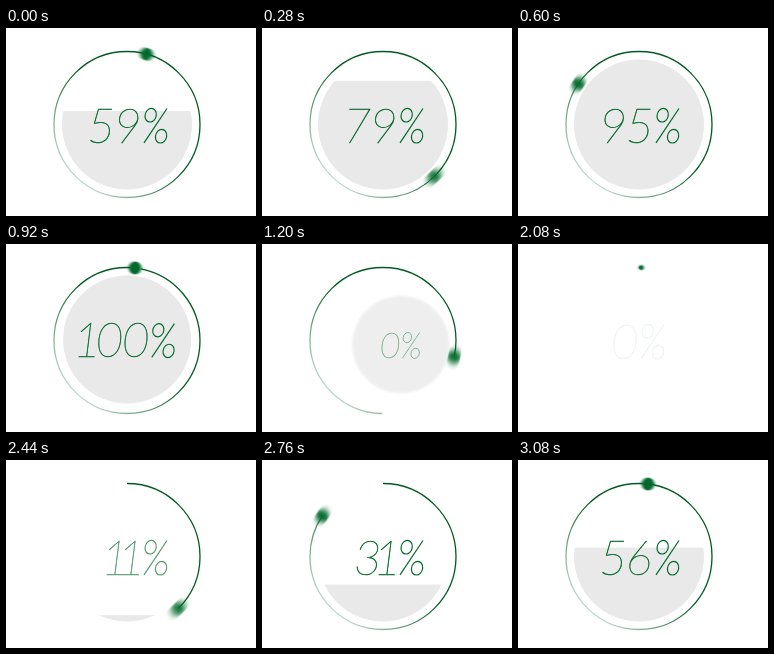
Animation of 250 by 188 pixels, one loop 3120 ms. Source, as an HTML page:

```html
<!DOCTYPE html>
<html lang="en">
<head>
<meta charset="utf-8">
<title>Percent loader</title>
<style>
  html, body { margin: 0; width: 100%; height: 100%; overflow: hidden; background: #fff; }
  svg { display: block; width: 100vw; height: 100vh; }
  text { font: italic 100 49px Lato, sans-serif; fill: #00692a; stroke: #00692a; stroke-width: 0.45; }
  #sign { fill: none; stroke: #00692a; stroke-width: 1.2; }
</style>
</head>
<body>
<svg viewBox="0 0 250 188">
  <defs>
    <linearGradient id="fade" gradientUnits="userSpaceOnUse" x1="-52" y1="52" x2="4" y2="-4">
      <stop offset="0" stop-color="#bcd8ca"/>
      <stop offset="1" stop-color="#005a22"/>
    </linearGradient>
    <clipPath id="disc"><circle r="65"/></clipPath>
    <filter id="smear" x="-3" y="-1" width="7" height="3"><feGaussianBlur id="smearBlur"/></filter>
    <filter id="soft"><feGaussianBlur stdDeviation="1.3"/></filter>
  </defs>
  <g transform="translate(121 96.5)">
    <g id="body">
      <g id="fill"><g clip-path="url(#disc)"><rect id="level" x="-70" width="140" height="160" fill="#e9e9e9"/></g></g>
      <g id="label">
        <text id="digits"></text>
        <g id="sign" aria-label="%">
          <ellipse cx="-17.3" cy="-9.3" rx="5.6" ry="6.8" transform="skewX(-6)"/>
          <ellipse cx="-4.7" cy="11.7" rx="5.6" ry="6.8" transform="skewX(-6)"/>
          <path d="M0-16L-23 18.3"/>
        </g>
      </g>
    </g>
    <path id="ring" d="M0-73A73 73 0 0 1 0 73A73 73 0 0 1 0-73" pathLength="360"
          fill="none" stroke="url(#fade)" stroke-width="1.3"/>
    <g id="spin"><circle id="dot" cy="-73" fill="#00692a" filter="url(#smear)"/></g>
  </g>
</svg>
<script>
const LOOP = 3120, FRAME = 40, START = 2040, TURN = 960, EXIT = 2 * TURN;
const RADIUS = 73;
const $ = id => document.getElementById(id);
const set = (id, attrs) => {
  for (const name in attrs) $(id).setAttribute(name, attrs[name]);
};
const clamp = v => Math.min(1, Math.max(0, v));
const ease = v => { const u = clamp(v); return u * u * (3 - 2 * u); };

const leaving = s => ease((s - EXIT) / 1100);
const headAngle = s => 360 * (ease(s / TURN) + ease((s - TURN) / TURN) + ease((s - EXIT) / 1020));

// Proportional figures, set from the percent sign leftwards.
function setLabel(value) {
  const digits = String(value);
  const right = [25, 40, 48][digits.length - 1];
  let x = right - 27;
  let html = "";
  for (const d of [...digits].reverse()) {
    const narrow = d === "1";
    x -= narrow ? 16 : 26.5;
    html = `<tspan x="${x - (narrow ? 7 : 0)}" y="18">${d}</tspan>` + html;
  }
  set("sign", { transform: `translate(${right} 0)` });
  if ($("digits").dataset.value !== digits) {
    $("digits").dataset.value = digits;
    $("digits").innerHTML = html;
  }
}

function draw(ms) {
  const t = Math.floor((ms % LOOP) / FRAME + 1e-4) * FRAME;
  const s = (t - START + LOOP) % LOOP;
  const out = leaving(s), count = ease(s / EXIT), head = headAngle(s);
  const rad = head * Math.PI / 180;

  const tail = 720 * out;
  const length = s < EXIT ? Math.min(360, head) : Math.max(0, Math.min(360, head - 360 - tail));
  set("ring", {
    "stroke-dasharray": `${length} ${360 - length}`,
    "stroke-dashoffset": -(tail % 360),
    visibility: length > 0.2 ? "visible" : "hidden"
  });

  const speed = (headAngle(s + 10) - headAngle(s - 10)) * Math.PI / 180 * RADIUS;
  const size = clamp(s / 100) * (1 - clamp((s - 2840) / 160));
  set("spin", { transform: `rotate(${head})` });
  set("dot", { r: 6.4 * size });
  set("smearBlur", { stdDeviation: `${0.5 + speed / 3.8} 0.5` });

  // The filled disc and its label are drawn into the moving dot.
  const pull = RADIUS * out;
  set("body", { transform: `translate(${pull * Math.sin(rad)} ${-pull * Math.cos(rad)}) scale(${1 - out})` });
  set("fill", { opacity: 1 - out, filter: out > 0.02 ? "url(#soft)" : "none" });
  set("level", { y: 75.5 - 150 * count });
  set("label", { opacity: clamp(s / 600) * clamp(1 - 2 * out) });
  setLabel(s >= 2200 ? 0 : Math.floor(100 * count));
}

function tick() {
  draw(performance.now());
  requestAnimationFrame(tick);
}
draw(0);
requestAnimationFrame(tick);
</script>
</body>
</html>
```
